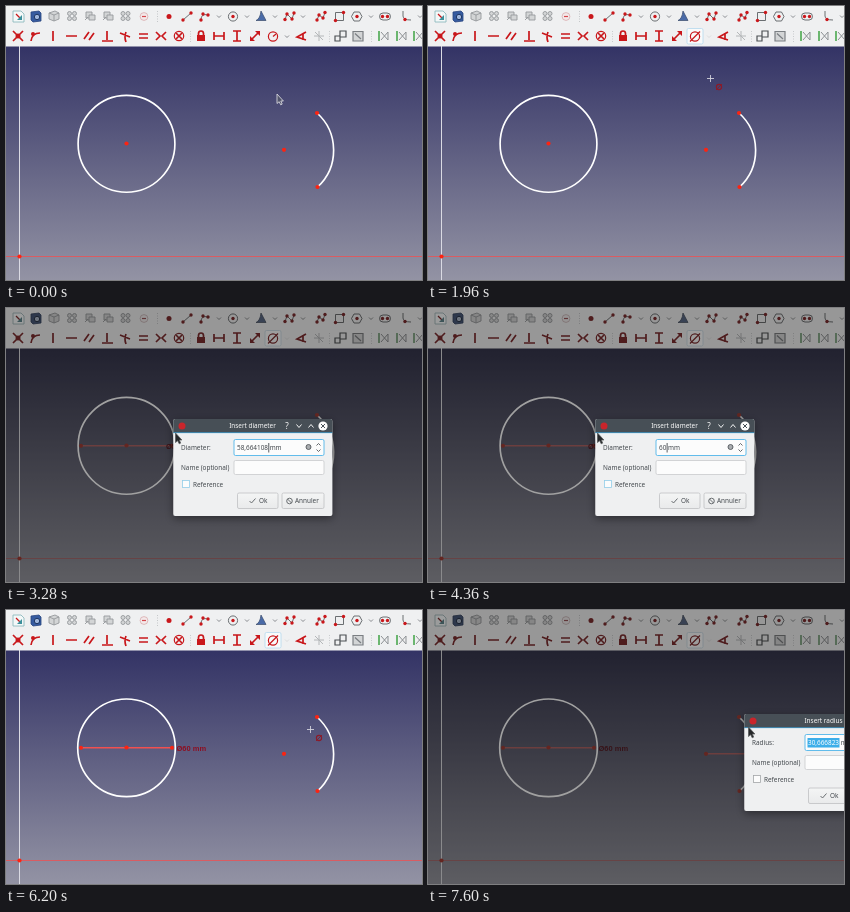
An HTML page that plays this animation: 416 by 274 pixels, repeating every 8000 ms.

```html
<!DOCTYPE html>
<html lang="en">
<head>
<meta charset="utf-8">
<title>Sketcher: radius and diameter constraints</title>
<style>
  html, body { margin: 0; width: 100%; height: 100%; overflow: hidden; background: #333365; }
  svg { display: block; width: 416px; height: 274px; }
  text { font: 6.4px "Noto Sans", sans-serif; fill: #43484d; }
  .dimmed { filter: saturate(.45) brightness(.63); }
  .line { fill: none; stroke: #c9171b; stroke-width: 1.7; }
  .fine { stroke-width: 1.2; }
  .thin { fill: none; stroke: #5c6064; stroke-width: .9; }
  .gray { fill: #d3d5d6; stroke: #96999c; stroke-width: .9; }
  .red { fill: #c9171b; }
  .curve { fill: none; stroke: #fff; stroke-width: 1.65; }
  .dot { fill: #fb2412; }
  .measure { fill: none; stroke: #f25050; stroke-width: 1.5; }
  .label { font: bold 7.5px "Liberation Sans", sans-serif; fill: #8c0f22; }
  .field { fill: #fcfcfc; stroke: #c9cbcd; stroke-width: .8; }
  .button { fill: url(#face); stroke: #bfc1c3; stroke-width: .8; }
  .title { fill: #fcfcfc; text-anchor: middle; }
  .glyph { fill: none; stroke: #f3f4f4; stroke-width: 1; }
</style>
</head>
<body>
<svg viewBox="0 0 416 274">
  <defs>
    <linearGradient id="sky" x2="0" y2="1">
      <stop stop-color="#333365"/><stop offset="1" stop-color="#9393a4"/>
    </linearGradient>
    <linearGradient id="face" x2="0" y2="1">
      <stop stop-color="#f4f5f5"/><stop offset="1" stop-color="#e9eaeb"/>
    </linearGradient>
    <filter id="shadow" x="-20%" y="-20%" width="140%" height="150%">
      <feDropShadow dx="0" dy="2.5" stdDeviation="4" flood-opacity=".42"/>
    </filter>
    <path id="chevron" d="M-2-1L0 1 2-1" fill="none" stroke="#7d8185" stroke-width=".9"/>
    <g id="cube">
      <path d="M-5-3L1-5 5-3V3L0 5-5 3Z"/><path d="M-5-3L0-1 5-3M0-1V5" fill="none"/>
    </g>
    <g id="pages">
      <path d="M-4-4H2V2H-4Z"/><path d="M-1-1H5V4H-1Z"/><path d="M-5 4L-2 1" fill="none"/>
    </g>
    <g id="cluster">
      <circle cx="-2.500" cy="-2.500" r="2"/><circle cx="2.500" cy="-2.500" r="2"/>
      <circle cx="-2.500" cy="2.500" r="2"/><circle cx="2.500" cy="2.500" r="2"/>
    </g>
    <g id="mesh">
      <path d="M-4-5V5" stroke="#4aa84f" stroke-width="1.600"/>
      <path d="M-2-4L5 4M5-4L-2 4M5-4V4" fill="none" stroke="#8d9194"/>
    </g>
  </defs>

  <g id="scene">
    <rect y="40" width="416" height="234" fill="url(#sky)"/>
    <path d="M13.500 40V274" stroke="#dadae3"/>
    <path d="M0 250.500H416" stroke="#d95c62"/>
    <circle class="dot" cx="13.500" cy="250.500" r="2.100"/>
    <circle class="curve" id="circle" cx="120.500" cy="137.800"/>
    <path class="curve" d="M311 107A50 50 0 0 1 311.500 181"/>
    <g id="diameter">
      <path class="measure" d="M74 137.700H167"/>
      <circle class="dot" cx="75" cy="137.700" r="2"/><circle class="dot" cx="166" cy="137.700" r="2"/>
      <text class="label" id="size" y="141"></text>
    </g>
    <g id="radius">
      <path class="measure" d="M278 143.700H328"/>
      <circle class="dot" cx="326" cy="143.700" r="2"/>
    </g>
    <circle class="dot" cx="120.500" cy="137.500" r="2.100"/>
    <circle class="dot" cx="278" cy="143.800" r="2.100"/>
    <circle class="dot" cx="311" cy="107" r="2.100"/>
    <circle class="dot" cx="311.500" cy="181" r="2.100"/>

    <rect width="416" height="40.500" fill="#eff0f1"/>
    <g id="topRow">
      <path d="M7 5H15L18 8V16H7Z" fill="#f4f8f8" stroke="#8db9be" stroke-width=".9"/>
      <path class="line fine" d="M10 8L14 12"/><path d="M11 14L16 9V14Z" fill="#3c8f9b"/>
      <path d="M25 6L33 5 35 7V15L27 16 25 14Z" fill="#365ba0" stroke="#27457f" stroke-width=".8"/>
      <circle cx="31" cy="11" r="2.700" fill="#9fb6dc" stroke="#1f3763"/>
      <g class="gray"><use href="#cube" x="48" y="10"/><use href="#cluster" x="66" y="10"/>
        <use href="#pages" x="84" y="10"/><use href="#pages" x="102" y="10"/><use href="#cluster" x="119.500" y="10"/></g>
      <circle cx="138" cy="10.500" r="3.900" fill="#f3e9ea" stroke="#dcb3b5" stroke-width=".9"/>
      <path d="M136 10.500H140" stroke="#d5474c" stroke-width="1.200"/>
      <path d="M151.500 5V16" stroke="#c4c7c9" stroke-dasharray="1 1.500"/>
      <g class="thin">
        <path d="M177 14L185 7M195 14Q195 7 202 9"/>
        <circle cx="227" cy="10.500" r="4.600"/>
        <path d="M279 13.500L281 8 286 13 288 7M311 14L313 9 317 12 319 6.500M329.500 6.500H337.500V14.500H329.500Z"/>
        <path d="M348 6H353.500L356 10.500 353.500 15H348L345.500 10.500Z"/>
        <rect x="373.500" y="7" width="11" height="7" rx="3.500"/>
        <path d="M397 5V10Q397 14 405 14"/>
      </g>
      <path d="M250 14.500Q254 13 255 5L260 14.500Z" fill="#4a6ba8" stroke="#3b4c6c" stroke-width=".7"/>
      <g class="red" id="nodes"></g>
      <g id="chevrons"></g>
    </g>

    <g class="line">
      <path d="M7 25L17 35M17 25L7 35M25 35Q26 27 34 27M47 25V35M60 30H71"/>
      <path d="M78 33L83 26M83 34L88 27M101 25V34M96 35H107M114 27L124 31M120 36Q118 31 120 26"/>
      <path d="M133 28H142M133 32H142M150 26L154 30 150 34M160 26L156 30 160 34"/>
      <circle class="fine" cx="173" cy="30" r="4.700"/><path d="M170 27L176 33M176 27L170 33"/>
      <path d="M192.500 29V27.500A2.500 2.500 0 0 1 197.500 27.500V29"/>
      <path d="M208 26V34M218 26V34M208 30H218M227 25H235M227 35H235M231 25V35M245 34L253 26"/>
      <path d="M300 26L291 31 300 34M297 27V34"/>
    </g>
    <path class="red" d="M191 29H199V35H191ZM244 35V30L249 35ZM254 25V30L249 25Z"/>
    <path d="M308 30H318M313 25V35M309 26L317 34" fill="none" stroke="#b4b7b9"/>
    <path d="M184.500 25V36M323.500 25V36M365.500 25V36" stroke="#c8cbcd" stroke-dasharray="1 1.500"/>
    <path d="M329 30H334V35H329ZM334 25H340V31H334Z" fill="none" stroke="#4c5054" stroke-width="1.200"/>
    <path d="M347 25.500H357V35H347ZM349 27.500L355 33" fill="#d3d5d6" stroke="#7b7f83" stroke-width="1.200"/>
    <use href="#mesh" x="377" y="30"/><use href="#mesh" x="395" y="30"/><use href="#mesh" x="412" y="30"/>
    <rect id="hover" x="259" y="22.500" width="16" height="15.500" rx="1.500" fill="#f9fafa" stroke="#b4d9ee" stroke-width=".8"/>
    <circle class="line fine" cx="267" cy="30.500" r="4.600"/>
    <path class="line fine" id="radiusMark" d="M267 30.500L270 28"/>
    <path class="line fine" id="diameterMark" d="M262 35.500L272 25.500"/>
    <use id="toolChevron" href="#chevron" x="281" y="30.500"/>

    <g id="menu">
      <rect x="257" y="38.500" width="125.500" height="41" fill="#eff0f1" stroke="#b4b7b9" stroke-width=".8"/>
      <rect id="pick" x="258" width="123.500" height="19" fill="#3daee9"/>
      <g class="line fine">
        <circle cx="267" cy="49.500" r="4"/><path d="M267 49.500L270 47"/>
        <circle cx="267" cy="69" r="4"/><path d="M263 73L271 65"/>
      </g>
      <text x="278" y="52">Constrain radius</text><text x="350" y="52">Shift+R</text>
      <text x="278" y="71.500">Constrain diameter</text>
    </g>
  </g>

  <g id="dialog">
    <g filter="url(#shadow)">
      <rect x="-.7" width="159" height="97" rx="2" fill="#eff0f1"/>
      <path d="M-.7 14V2Q-.7 0 1.300 0H156.300Q158.300 0 158.300 2V14Z" fill="#475057"/>
    </g>
    <path d="M-.7 13.700H158.300" stroke="#3daee9" stroke-width=".7"/>
    <circle cx="8" cy="7" r="3.500" fill="#c9252b"/>
    <text class="title" id="title" x="78.500" y="9.400"></text>
    <text class="title" x="113" y="9.700" style="font-size:8px">?</text>
    <path class="glyph" d="M122.500 5.500L125 8.500 127.500 5.500M134.500 8.500L137 5.500 139.500 8.500"/>
    <circle cx="149" cy="7" r="4.600" fill="#fcfcfc"/>
    <path d="M147 5L151 9M151 5L147 9" stroke="#475057"/>
    <text id="caption" x="7" y="30.700"></text>
    <rect class="field" x="60" y="20.500" width="90" height="16" rx="1.500" style="stroke:#3daee9"/>
    <rect id="selection" x="62.500" y="24" height="9.500" fill="#3daee9"/>
    <text x="63" y="31" xml:space="preserve"><tspan id="value"></tspan><tspan> mm</tspan></text>
    <path id="caret" stroke="#31363b" stroke-width=".8"/>
    <circle cx="134.500" cy="28" r="2.500" fill="#aaadb0" stroke="#54595d" stroke-width=".9"/>
    <path d="M142.500 26.500L144.500 24.500 146.500 26.500M142.500 30.500L144.500 32.500 146.500 30.500" fill="none" stroke="#54595d" stroke-width=".9"/>
    <text x="7" y="50.500">Name (optional)</text>
    <rect class="field" x="60" y="41.500" width="90" height="14" rx="1.500"/>
    <rect class="field" id="check" x="8.500" y="61.500" width="7" height="7"/>
    <text x="19" y="67.500">Reference</text>
    <rect class="button" x="63.500" y="74" width="40.500" height="15.500" rx="1.500"/>
    <path class="thin" d="M75.500 82L77.500 84 81.500 79.500"/><text x="85" y="84.300">Ok</text>
    <rect class="button" x="108" y="74" width="42" height="15.500" rx="1.500"/>
    <circle class="thin" cx="115.500" cy="82" r="2.800"/><path class="thin" d="M113.500 80L117.500 84"/>
    <text x="121" y="84.300">Annuler</text>
  </g>

  <g id="pointer">
    <path id="arrow" d="M0 0V9.500L2.200 7.700 3.700 10.800 5.200 10.100 3.800 7H6.400Z" stroke-width=".8"/>
    <g id="cross" fill="none">
      <path d="M-3.500 0H3.500M0-3.500V3.500" stroke="#d2d2dc" stroke-width=".9"/>
      <circle cx="8.500" cy="8.500" r="2.600" stroke="#8c1a28" stroke-width="1.100"/>
      <path d="M5.500 11.500L11.500 5.500" stroke="#8c1a28" stroke-width=".9"/>
    </g>
  </g>
</svg>
<script>
const $ = id => document.getElementById(id);
const show = (id, on) => { $(id).style.display = on ? '' : 'none'; };
const set = (id, attrs) => { for (const key in attrs) $(id).setAttribute(key, attrs[key]); };

// Small marks shared by the toolbar icons
const nodes = [[163, 10.5, 2.5], [177, 14], [185, 7], [195, 14], [197, 8], [202, 9], [227, 10.5],
  [279, 13.5], [281, 8], [286, 13], [288, 7], [311, 14], [313, 9], [317, 12], [319, 6.5],
  [329.5, 14.5], [337.5, 6.5], [351, 10.5], [376.5, 10.5], [381.5, 10.5], [399, 13.5],
  [12, 30, 2.5], [27, 28, 2]];
$('nodes').innerHTML = nodes.map(([x, y, r = 1.7]) => `<circle cx="${x}" cy="${y}" r="${r}"/>`).join('');
$('chevrons').innerHTML = [213, 241, 269, 297, 365, 414]
  .map(x => `<use href="#chevron" x="${x}" y="10.5"/>`).join('');

// Pointer moves: start, end, number of positions, from, to
const moves = [
  [40, 80, 2, [271, 88], [271, 71]],
  [280, 600, 6, [271, 71], [279, 28]],
  [960, 1120, 5, [279, 28], [279, 68]],
  [1960, 1960, 1, [279, 68], [282.5, 72.5]],
  [2120, 2760, 8, [282.5, 72.5], [171.5, 127.5]],
  [2920, 2920, 1, [171.5, 127.5], [169.5, 125]],
  [5120, 5120, 1, [169.5, 125], [171.5, 127.5]],
  [5720, 5960, 3, [171.5, 127.5], [255.5, 112.5]],
  [6200, 6200, 1, [255.5, 112.5], [304.5, 119.5]],
  [7200, 7200, 1, [304.5, 119.5], [312, 117]],
  [7360, 7600, 4, [312, 117], [320.5, 117]],
];

function pointerAt(t) {
  let at = moves[0][3];
  for (const [start, end, count, from, to] of moves) {
    if (t < start) break;
    const gap = (end - start) / Math.max(1, count - 1);
    const step = gap ? Math.min(count, 1 + Math.floor((t - start) / gap + 1e-6)) : count;
    at = from.map((v, i) => v + (to[i] - v) * step / count);
  }
  return at;
}

function drawDialog(t) {
  const second = t >= 7200;
  const typed = !second && t >= 4280;
  const selected = second ? t >= 7360 : t >= 3440 && !typed;
  set('dialog', { transform: second ? 'translate(317 104)' : 'translate(168 111)' });
  $('title').textContent = second ? 'Insert radius' : 'Insert diameter';
  $('caption').textContent = second ? 'Radius:' : 'Diameter:';
  $('value').textContent = second ? '30,666823' : !typed ? '58,664108' : t < 4360 ? '6' : '60';
  $('value').style.fill = selected ? '#fff' : '';
  const width = $('value').getComputedTextLength();
  set('selection', { width: width + 1 });
  show('selection', selected);
  set('caret', { d: `M${63.8 + width} 24V33.500` });
  show('caret', typed || (!second && t < 3760));
  $('check').style.stroke = second ? '#a3a6a9' : '#93cee9';
}

function draw(t) {
  const dialog = (t >= 3280 && t < 4880) || t >= 7200;
  const cross = (t >= 1960 && t < 2920) || (t >= 5120 && t < 7200);
  const resized = t >= 5000;
  const yellow = (t >= 2680 && t < 3280) || (t >= 5720 && t < 5840);
  const [x, y] = pointerAt(t);

  set('scene', { class: dialog ? 'dimmed' : '' });
  set('circle', { r: resized ? 48.8 : 48.4 });
  $('circle').style.stroke = yellow ? '#e9e613' : '';
  $('circle').style.strokeWidth = yellow ? 1.4 : '';
  show('diameter', t >= 3280);
  set('size', { x: resized ? 170.5 : 160 });
  $('size').textContent = resized ? 'Ø60 mm' : 'Ø58,6641 mm';
  show('radius', t >= 7200);

  show('hover', t >= 480);
  show('radiusMark', t < 1960);
  show('diameterMark', t >= 1960);
  $('toolChevron').style.opacity = t < 1960 ? 1 : .2;
  show('menu', t >= 920 && t < 1960);
  show('pick', y > 40);
  set('pick', { y: y < 59 ? 40 : 59.5 });

  show('dialog', dialog);
  if (dialog) drawDialog(t);

  show('pointer', t < 4880 || t >= 5120);
  set('pointer', { transform: `translate(${x} ${y})` });
  show('arrow', !cross);
  show('cross', cross);
  set('arrow', { fill: dialog ? '#26282a' : '#50536a', stroke: dialog ? '#5b5d5f' : '#e6e6ea' });
}

const begin = performance.now();
function tick() {
  draw((performance.now() - begin) % 8000);
  requestAnimationFrame(tick);
}
tick();
</script>
</body>
</html>
```
